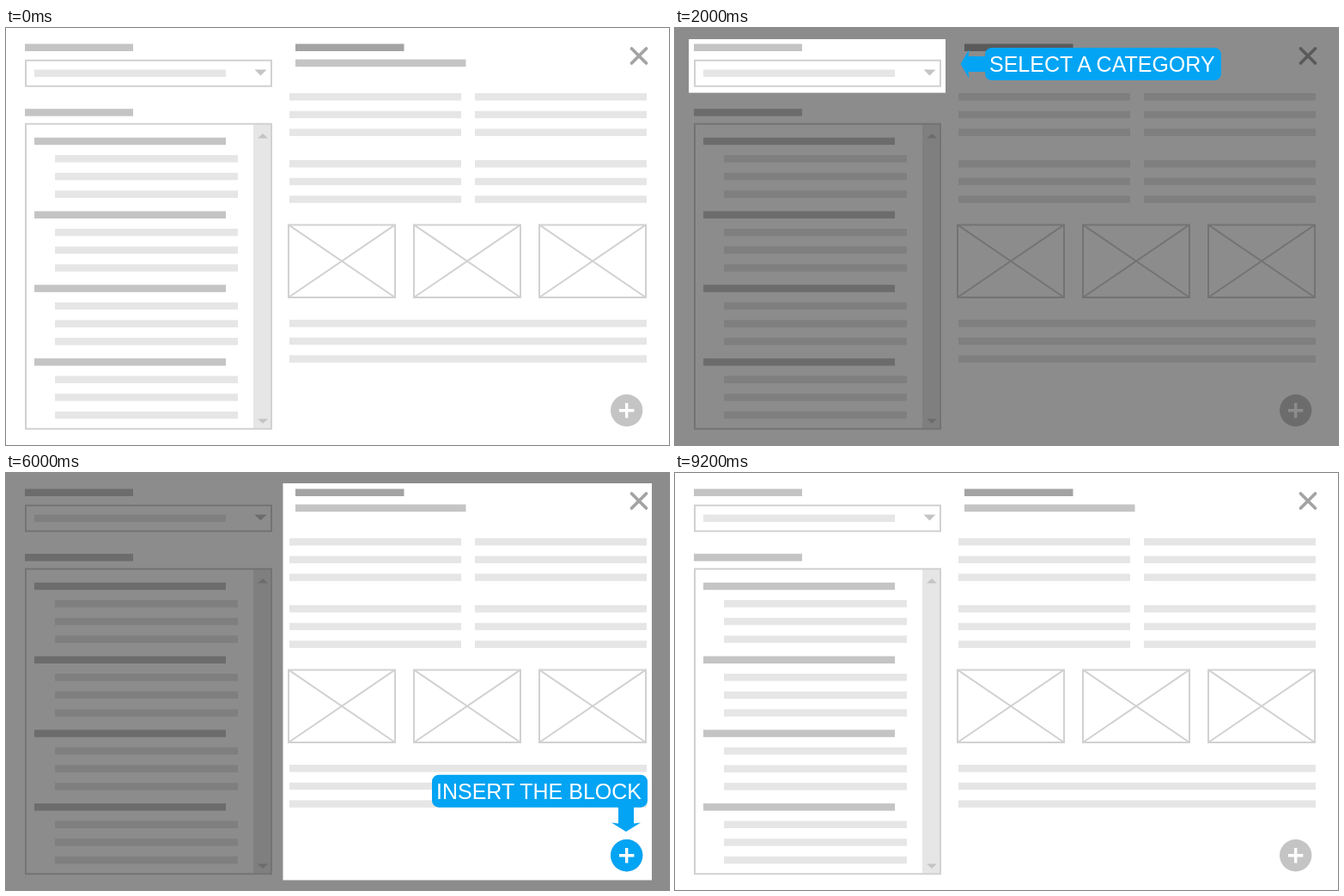
Animation, 772 px wide and 486 px high, one loop 10000 ms. Source, as an HTML page:

```html
<!DOCTYPE html>
<html lang="en">
<head>
<meta charset="utf-8">
<title>Block picker guide</title>
<style>
  html, body { margin: 0; width: 100%; height: 100%; overflow: hidden; background: #fff; }
  svg { display: block; width: 772px; height: 486px; }
  text { font: 25px "Liberation Sans", Arial, sans-serif; fill: #fff; }
</style>
</head>
<body>
<svg id="stage" viewBox="0 0 772 486"></svg>
<script>
const LIGHT = '#e6e6e6', MID = '#c4c4c4', DARK = '#a3a3a3', LINE = '#d1d1d1', BLUE = '#03a4f3';
const BAR = 8.5, GAP = 20.7;
const stage = document.getElementById('stage');

function add(tag, attrs, parent = stage) {
  const el = document.createElementNS('http://www.w3.org/2000/svg', tag);
  for (const key in attrs) el.setAttribute(key, attrs[key]);
  return parent.appendChild(el);
}

const path = (d, fill, parent) => add('path', { d, fill }, parent);
const stroke = (d, color, width, cap = 'butt', parent) =>
  add('path', { d, fill: 'none', stroke: color, 'stroke-width': width, 'stroke-linecap': cap }, parent);
const bar = (x, y, width, fill) => add('rect', { x, y, width, height: BAR, fill });
const frame = (x, y, w, h) => stroke(`M${x} ${y}h${w}v${h}h${-w}z`, LINE, 2);

function lines(x, y, width) {
  for (let i = 0; i < 3; i++) bar(x, y + i * GAP, width, LIGHT);
}

function plusButton(color, parent) {
  add('circle', { cx: 722.7, cy: 445.7, r: 18.7, fill: color }, parent);
  stroke('M714 445.7h17.4M722.7 437v17.4', '#fff', 3.4, 'butt', parent);
}

function drawPicker() {
  bar(22, 18.5, 126, MID);
  frame(23, 37.8, 286, 30);
  bar(33, 48.5, 223, LIGHT);
  path('M289.5 48.5h14l-7 7z', MID);

  bar(22, 94.2, 126, MID);
  add('rect', { x: 288, y: 112, width: 21, height: 355, fill: LIGHT });
  frame(23, 111.8, 286, 355.4);
  path('M293 128.5h12l-6 -5.5z', MID);
  path('M293 455.5h12l-6 5.5z', MID);
  for (let i = 0; i < 4; i++) {
    const y = 127.7 + i * 85.8;
    bar(33, y, 223, MID);
    lines(57, y + 20.4, 213);
  }
}

function drawPreview() {
  bar(337, 18.5, 126.5, DARK);
  bar(337, 36.6, 198.5, MID);
  stroke('M728.5 24l17 17m0 -17l-17 17', DARK, 3.8, 'round');
  for (const x of [330, 546]) {
    lines(x, 76, 200);
    lines(x, 154, 200);
  }
  for (const x of [329, 475, 621]) {
    frame(x, 229.4, 124, 84.6);
    stroke(`M${x} 229.4l124 84.6m0 -84.6l-124 84.6`, LINE, 2);
  }
  lines(330, 340, 416);
  plusButton(MID);
}

// One guide step: everything dimmed except the box, plus a labelled bubble.
function guide([x, y, w, h], [bx, by, bw], label, arrow) {
  const g = add('g', { visibility: 'hidden' });
  add('path', {
    d: `M0 0H772V486H0zM${x} ${y}v${h}h${w}v${-h}z`,
    'fill-opacity': .45
  }, g);
  path(arrow, BLUE, g);
  add('rect', { x: bx, y: by, width: bw, height: 38, rx: 8, fill: BLUE }, g);
  add('text', { x: bx + 5, y: by + 28 }, g).textContent = label;
  return g;
}

const leftArrow = y => `M332.5 ${y}L342.5 ${y - 17}L341.5 ${y - 9}H364V${y + 9}H341.5L342.5 ${y + 17}z`;

drawPicker();
drawPreview();

const category = guide([16, 13, 299, 62.5], [361, 23, 275], 'SELECT A CATEGORY', leftArrow(42));
const block = guide([16, 88, 299, 386.5], [361, 167, 221.5], 'SELECT A BLOCK', leftArrow(186));
const insert = guide([322.5, 12, 429.5, 462.5], [496, 351.7, 251], 'INSERT THE BLOCK',
  'M722 418L705 407.5L713 408.5V386H731V408.5L739 407.5z');
plusButton(BLUE, insert);

const steps = [null, category, block, insert, null];
const HOLD = 2000;

function tick() {
  const current = steps[Math.floor(performance.now() / HOLD) % steps.length];
  for (const g of [category, block, insert])
    g.setAttribute('visibility', g === current ? 'visible' : 'hidden');
  requestAnimationFrame(tick);
}
tick();
</script>
</body>
</html>
```
